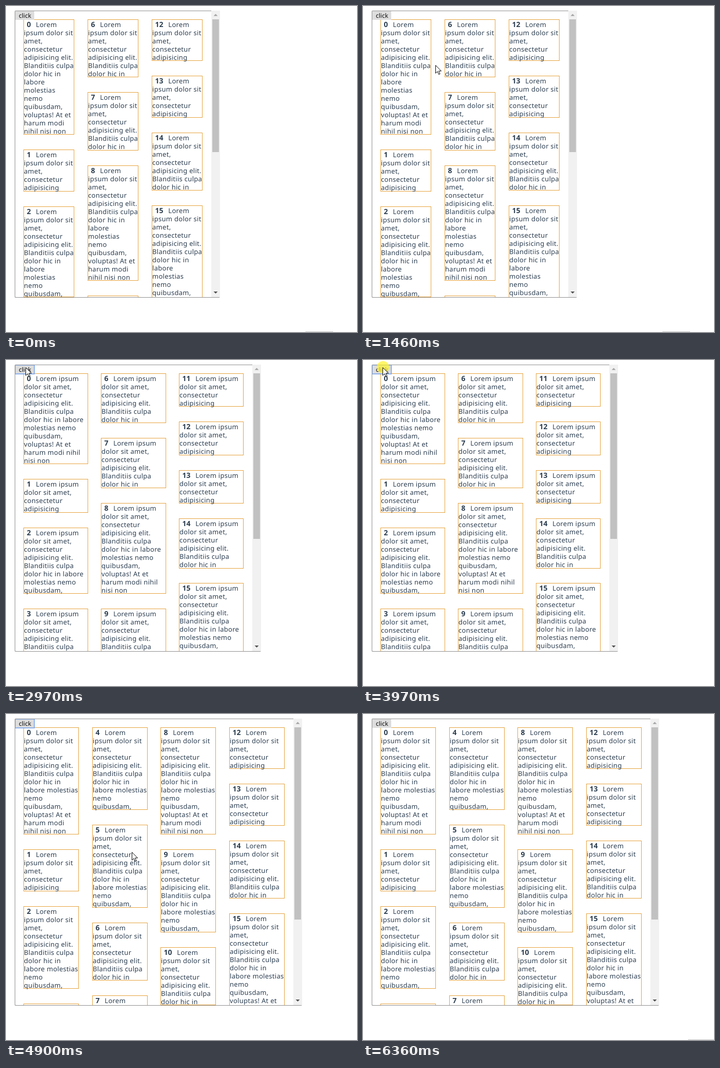
Animation of 684x636 px, one loop 6.45 s. Source, as an HTML page:

```html
<!DOCTYPE html>
<html lang="en">
<head>
<meta charset="utf-8">
<title>Column layout</title>
<style>
  html, body { margin: 0; width: 100%; height: 100%; overflow: hidden; background: #fff; }
  body {
    position: relative; color: #2c3e50; text-rendering: geometricPrecision;
    font: 13px/16px "Noto Sans", "Open Sans", sans-serif; letter-spacing: .3px;
  }
  div, svg { position: absolute; box-sizing: border-box; }
  .panel {
    left: 17px; top: 9px; height: 560px; overflow: hidden;
    border: 1px solid #8f8f8f; border-right: 0; border-radius: 2px;
  }
  .panel, .track { background-clip: padding-box; }
  .card { border: 1px solid #e6a23c; padding-top: 1px; white-space: pre; }
  .card b { font-size: 14px; line-height: 0; letter-spacing: 0; padding: 0 9.8px 0 5.5px; }
  .track { top: 9px; width: 17px; height: 559px; background: #f1f1f1; }
  .thumb { left: 2px; top: 17px; width: 13px; background: #c1c1c1; }
  .track svg { left: 0; top: 0; }
  #button {
    left: 18px; top: 10px; width: 37px; height: 17px; padding-left: 7px;
    background: #ddd; color: #111; font-size: 12px; line-height: 17px; letter-spacing: 0;
  }
  #button.focus {
    box-shadow: inset 0 0 0 1px #9dbdf0, 0 0 0 1px #7ba3e4;
    clip-path: inset(0 -1px -1px 0);
  }
  #halo { left: 27px; top: 2px; width: 24px; height: 24px; border-radius: 50%; background: rgba(255, 243, 50, .72); }
  #dots { top: 635px; height: 1px; background: repeating-linear-gradient(90deg, #888 0 1px, #fff 1px 2px); }
  #cursor { left: 0; top: 0; overflow: visible; }
</style>
</head>
<body>
<div id="stage"></div>
<div id="button">click</div>
<div id="dots"></div>
<div id="halo"></div>
<svg id="cursor" width="13" height="20">
  <path d="M.5 .7V16.2L4.1 12.8 6.6 18.5 9 17.5 6.6 11.9H11.5Z" fill="#fff" stroke="#000"/>
</svg>
<script>
const LOOP = 6450, STEP = 77.5;
const GAP = { x: 25.7, y: 30.46 };
const $ = id => document.getElementById(id);

// Last words of each text length, and the length used by every card.
const ends = { S: "adipisicing", M: "hic in", Q: "quibusdam,", X: "nisi non" };
const sizes = "XSQQQQMMXQMSSSMX";

const narrow = "Lorem|ipsum dolor sit|amet,|consectetur|adipisicing elit.|Blanditiis culpa|dolor hic in|" +
  "labore|molestias|nemo|quibusdam,|voluptas! At et|harum modi|nihil nisi non";
const wide = "Lorem ipsum|dolor sit amet,|consectetur|adipisicing elit.|Blanditiis culpa|" +
  "dolor hic in labore|molestias nemo|quibusdam,|voluptas! At et|harum modi nihil|nisi non";

// "heads" holds the first card of each column.
const layouts = [
  { from: 0, width: 400, thumb: 259, heads: [0, 6, 12], text: narrow },
  { from: 2970, width: 480, thumb: 323, heads: [0, 6, 11], text: wide },
  { from: 4050, width: 560, thumb: 375, heads: [0, 4, 8, 12], text: narrow.replace("labore|", "labore ") }
];

function add(parent, className, styles = {}) {
  const node = document.createElement("div");
  node.className = className;
  for (const key in styles) node.style[key] = styles[key] + "px";
  return parent.appendChild(node);
}

// Adds one card and returns the top of the next.
function addCard(panel, text, index, x, y, width) {
  const end = ends[sizes[index]];
  const shown = text.slice(0, text.indexOf(end) + end.length);
  const height = 16 * shown.split("|").length;
  const left = Math.round(x), top = Math.round(y);
  const card = add(panel, "card", {
    left: left - 18, top: top - 10,
    width: Math.round(x + width) - left,
    height: Math.round(y + height + 1.6) - top
  });
  card.innerHTML = `<b>${index}</b>${shown.replaceAll("|", "\n")}`;
  return y + height + GAP.y;
}

function buildLayout({ width, thumb, heads, text }) {
  const root = add($("stage"), "");
  const panel = add(root, "panel", { width });
  const pitch = (width - 50.4 + GAP.x) / heads.length;
  heads.forEach((head, column) => {
    for (let i = head, y = 25.6; y < 569; i++)
      y = addCard(panel, text, i, 33.7 + column * pitch, y, pitch - GAP.x);
  });
  const track = add(root, "track", { left: width });
  track.innerHTML = `<svg width="17" height="559"><path d="M4.5 10.5h8l-4-4z" fill="#a3a3a3"/>
    <path d="M4.5 548h8l-4 4z" fill="#505050"/></svg>`;
  add(track, "thumb", { height: thumb });
  return root;
}

// Each stroke bends from the previous end towards "via" and stops at "to".
const entry = [790, 850];
const strokes = [
  { at: 150, steps: 9, via: [-279, -269], to: [328, 320] },
  { at: 840, steps: 9, via: [-59, 115], to: [141, 115] },
  { at: 1540, steps: 6, via: [38, 30], to: [38, 35] },
  { at: 2110, steps: 3, via: [38, 22], to: [38, 14] },
  { at: 4510, steps: 6, via: [60, -54], to: [245, 269] },
  { at: 4980, steps: 3, via: [380, 350], to: [525, 220] },
  { at: 5200, steps: 9, via: [19, -186], to: [636, 594] },
  { at: 5900, steps: 3, via: [636, 610], to: [637, 626] }
];

function pointerAt(t) {
  const i = strokes.findLastIndex(stroke => t >= stroke.at);
  if (i < 0 || t >= 6130) return null;
  const { at, steps, via, to } = strokes[i];
  const from = i ? strokes[i - 1].to : entry;
  const u = Math.min(1, (Math.floor((t - at) / STEP + .1) + 1) / steps);
  return from.map((p, k) => Math.round((1 - u) ** 2 * p + 2 * u * (1 - u) * via[k] + u * u * to[k]));
}

const views = layouts.map(buildLayout);
const within = (t, a, b) => t >= a && t < b;
const show = (node, on) => { node.style.display = on ? "block" : "none"; };

function render(t) {
  const active = layouts.findLastIndex(layout => t >= layout.from);
  views.forEach((view, i) => show(view, i === active));

  const point = pointerAt(t);
  show($("cursor"), point);
  if (point) $("cursor").style.transform = `translate(${point[0]}px, ${point[1]}px)`;

  $("button").classList.toggle("focus", within(t, 2410, 6360));
  show($("halo"), within(t, 2410, 2970) || within(t, 3900, 4050));

  const late = t >= 6360;
  show($("dots"), t < 2410 || late);
  $("dots").style.left = late ? "634px" : "584px";
  $("dots").style.width = late ? "50px" : "53px";
}

const origin = performance.now();
function tick() {
  render((performance.now() - origin) % LOOP);
  requestAnimationFrame(tick);
}
tick();
</script>
</body>
</html>
```
